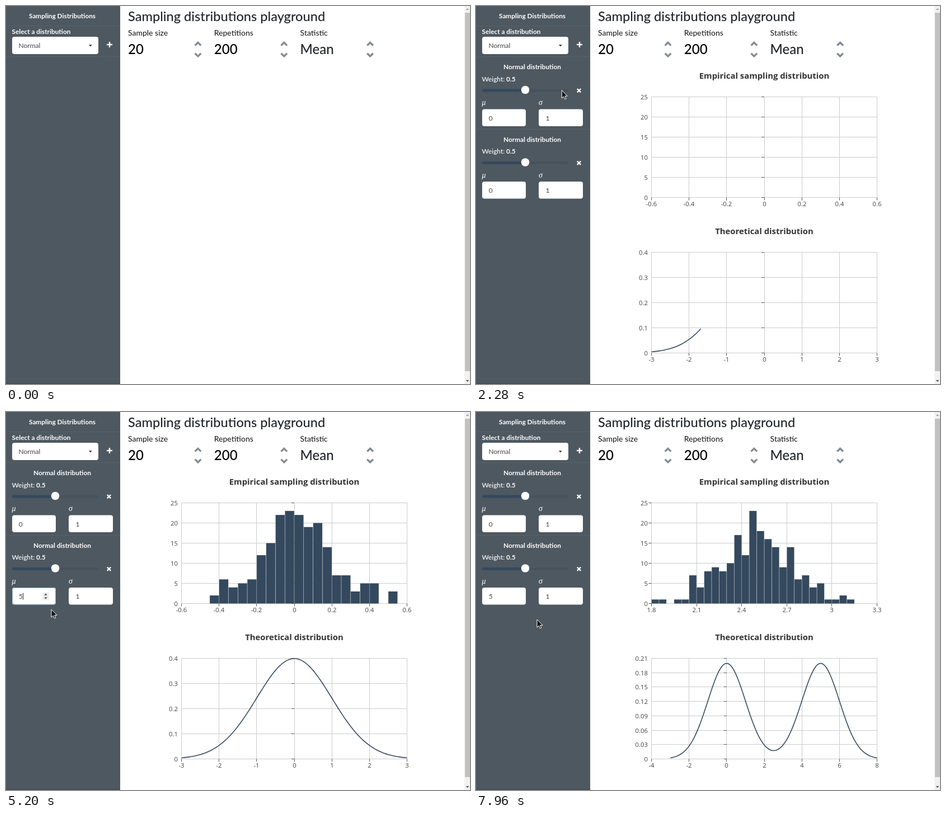
Write an HTML page with a canvas that moves like this. It is 829 by 676 pixels and loops after 8000 ms.

```html
<!DOCTYPE html>
<html lang="en">
<head>
<meta charset="utf-8">
<title>Sampling distributions playground</title>
<style>
html, body { margin: 0; width: 100%; height: 100%; overflow: hidden; background: #fff; }
canvas { display: block; }
</style>
</head>
<body>
<canvas id="stage" width="829" height="676"></canvas>
<script>
const c = document.getElementById('stage').getContext('2d');
const LOOP = 8000;
const NAVY = '#34495e', SIDE = '#4e5860';
const LATO = 'Lato, sans-serif', PLOT = '"Open Sans", sans-serif';

const clamp = v => Math.max(0, Math.min(1, v));
const span = (t, from, to) => clamp((t - from) / (to - from));
const within = (t, from, to) => t >= from && t < to;
const mix = (a, b, k) => a + (b - a) * k;
const expOut = k => k >= 1 ? 1 : 1 - 2 ** (-10 * k);

function text(s, x, y, font, color = '#fff', align = 'left') {
  c.font = font;
  c.fillStyle = color;
  c.textAlign = align;
  c.fillText(s, x, y);
}
function rect(x, y, w, h, color) {
  c.fillStyle = color;
  c.fillRect(x, y, w, h);
}
function round(x, y, w, h, r, color) {
  c.fillStyle = color;
  c.beginPath();
  c.roundRect(x, y, w, h, r);
  c.fill();
}
function disc(x, y, r, color) {
  c.fillStyle = color;
  c.beginPath();
  c.arc(x, y, r, 0, 7);
  c.fill();
}
function trace(points) {
  c.beginPath();
  points.forEach(([x, y]) => c.lineTo(x, y));
}
function line(points, color, width = 1) {
  trace(points);
  c.strokeStyle = color;
  c.lineWidth = width;
  c.stroke();
}
function poly(points, color) {
  trace(points);
  c.fillStyle = color;
  c.fill();
}

// ---- page furniture ----
function header() {
  text('Sampling distributions playground', 218, 27, '500 23.6px ' + LATO, '#212529');
  const fields = [
    ['Sample size', '20', '#000', '#818b94'],
    ['Repetitions', '200', '#000', '#8a8a8a'],
    ['Statistic', 'Mean', '#212529', '#7d8891']
  ];
  fields.forEach(([label, value, ink, arrow], i) => {
    const x = 218 + i * 153.8;
    text(label, x, 53, '14px ' + LATO, '#111');
    text(value, x, 86, '500 24px ' + LATO, ink);
    const m = x + 125;
    line([[m - 5.3, 70.6], [m, 65.3], [m + 5.3, 70.6]], arrow, 3.4);
    line([[m - 5.3, 84.6], [m, 89.9], [m + 5.3, 84.6]], arrow, 3.4);
  });
}
function scrollbar() {
  rect(819, 0, 10, 676, '#f1f1f1');
  rect(820, 12, 9, 641, '#c1c1c1');
  poly([[821.5, 7], [824.5, 4], [827.5, 7]], '#a3a3a3');
  poly([[821.5, 669], [824.5, 672], [827.5, 669]], '#505050');
}
function rule(y) {
  rect(0, y, 204, 1, '#58626a');
}
function sidebar(t) {
  rect(0, 0, 204, 676, SIDE);
  rect(0, 674, 204, 2, '#454e56');
  text('Sampling Distributions', 100.5, 21.5, 'bold 11.8px ' + LATO, '#fff', 'center');
  rule(35);
  text('Select a distribution', 10.5, 50, 'bold 11.8px ' + LATO);
  round(11, 55, 154, 31, 4, '#fff');
  text('Normal', 22.5, 75, '12px ' + LATO, '#444');
  poly([[147.8, 69.2], [153.8, 69.2], [150.8, 72.4]], '#333');
  const plus = within(t, 940, 2100) ? '#28a745' : '#fff';
  rect(180, 67.8, 10, 2.4, plus);
  rect(183.8, 64, 2.4, 10, plus);
  rule(90);
  if (t >= 1400) panel(0);
  if (t >= 1720) panel(129.5, t);
}
function panel(y, t) {
  c.save();
  c.translate(0, y);
  text('Normal distribution', 100.5, 113, 'bold 11.8px ' + LATO, '#fff', 'center');
  text('Weight: ', 10.5, 134.7, '500 11.8px ' + LATO);
  const w = c.measureText('Weight: ').width;
  text('0.5', 10.5 + w, 134.7, 'bold 11.8px ' + LATO);
  round(11, 148.5, 154, 5, 2.5, '#48525b');
  round(11, 148.5, 77, 5, 2.5, NAVY);
  disc(88, 150, 7.3, '#fff');
  line([[180.8, 148], [187.2, 154.4]], '#fff', 2.3);
  line([[187.2, 148], [180.8, 154.4]], '#fff', 2.3);
  text('μ', 10.5, 177, 'italic 14px "Liberation Serif", serif');
  text('σ', 112, 177, 'italic 14px "Liberation Serif", serif');
  round(11, 184.5, 78, 30.5, 4, '#fff');
  round(112, 184.5, 79, 30.5, 4, '#fff');
  text('1', 124.5, 204.8, '12px ' + LATO, '#444');
  if (t) meanField(t);
  else text('0', 22.8, 204.8, '12px ' + LATO, '#444');
  if (!y) rule(220);
  c.restore();
}
function meanField(t) {
  const focus = span(t, 3720, 3880) * (1 - span(t, 5360, 5480));
  if (focus) {
    c.globalAlpha = focus;
    c.strokeStyle = '#8fb4d6';
    c.lineWidth = 1;
    c.beginPath();
    c.roundRect(11.5, 185, 77, 29.5, 4);
    c.stroke();
    c.globalAlpha = 1;
  }
  if (within(t, 3480, 5400)) {
    rect(65, 193, 12, 14, '#efefef');
    poly([[68.3, 198.2], [71, 194.8], [73.7, 198.2]], '#505050');
    poly([[68.3, 201.8], [71, 205.2], [73.7, 201.8]], '#505050');
  }
  const selected = within(t, 3800, 4760);
  if (selected) rect(23, 193.5, 7, 13, '#3390ff');
  text(t < 4760 ? '0' : '5', 22.8, 204.8, '12px ' + LATO, selected ? '#fff' : '#444');
  if (within(t, 3720, 5400) && !selected) rect(30, 194, 1, 12, '#222');
}

// ---- charts ----
const LEFT = 313.5, WIDE = 403, HIGH = 180;
const counts = [
  [2, 6, 4, 5, 6, 12, 15, 22, 23, 22, 19, 20, 14, 7, 7, 3, 5, 5, 0, 3],
  [1, 1, 0, 1, 1, 7, 4, 8, 9, 8, 10, 17, 12, 23, 18, 16, 14, 9, 14, 6, 7, 4, 5, 1, 1, 2, 1]
];
const histAxes = [
  { min: -0.6, max: 0.6, dx: 0.2, top: 25, dy: 5, first: -0.45 },
  { min: 1.8, max: 3.3, dx: 0.3, top: 25, dy: 5, first: 1.8 }
];
const curveAxes = [
  { min: -3, max: 3, dx: 1, top: 0.4, dy: 0.1, end: 3, mu: 0 },
  { min: -4, max: 8, dx: 2, top: 0.21, dy: 0.03, end: 8, mu: 5 }
];
const px = (a, v) => LEFT + WIDE * (v - a.min) / (a.max - a.min);
const label = v => String(+v.toFixed(2));

function axes(title, a, y0) {
  const base = y0 + HIGH;
  text(title, 515, y0 - 32.5, 'bold 14.85px ' + PLOT, '#333', 'center');
  const cols = Math.round((a.max - a.min) / a.dx), rows = Math.round(a.top / a.dy);
  const zero = a.min < 0 ? px(a, 0) : LEFT;
  for (let i = 0; i <= cols; i++) {
    const x = Math.floor(LEFT + WIDE * i / cols) + 0.5;
    line([[x, y0], [x, base]], '#ccc');
    text(label(a.min + i * a.dx), x, base + 15.5, '11.3px ' + PLOT, '#444', 'center');
  }
  for (let i = 0; i <= rows; i++) {
    const y = Math.floor(base - HIGH * i / rows) + 0.5;
    line([[LEFT, y], [LEFT + WIDE, y]], '#ccc');
    text(label(i * a.dy), 307, y + 4.2, '11.3px ' + PLOT, '#444', 'right');
  }
  for (let i = 0; i <= cols; i++) {
    const x = Math.floor(LEFT + WIDE * i / cols) + 0.5;
    line([[x, base], [x, base + 5]], '#555');
  }
  for (let i = 0; i <= rows; i++) {
    const y = Math.floor(base - HIGH * i / rows) + 0.5;
    line([[zero - 5, y], [zero, y]], '#555');
  }
}
function histogram(t) {
  const n = t < 5700 ? 0 : 1, a = histAxes[n], start = n ? 5680 : 2297;
  const grow = expOut(span(t, start, start + 1000));
  axes('Empirical sampling distribution', a, 162.5);
  counts[n].forEach((v, i) => {
    const x = px(a, a.first + i * 0.05), w = WIDE * 0.05 / (a.max - a.min);
    const h = HIGH * v / a.top * grow;
    rect(x + 0.25, 342.5 - h, w - 0.5, h, NAVY);
  });
}
const bell = x => Math.exp(-x * x / 2) / Math.sqrt(2 * Math.PI);
function curvePoint(a, k) {
  const x = mix(-3, a.end, k);
  return [px(a, x), 620.5 - HIGH * (bell(x) + bell(x - a.mu)) / 2 / a.top];
}
function density(t) {
  const [before, after] = curveAxes, updated = t >= 5700;
  const k = 1 - (1 - span(t, 5680, 5980)) ** 3;
  axes('Theoretical distribution', updated ? after : before, 440.5);
  const points = [];
  for (let i = 0; i <= 200; i++) {
    const p = curvePoint(before, i / 200), q = curvePoint(after, i / 200);
    points.push(updated ? [mix(p[0], q[0], k), mix(p[1], q[1], k)] : p);
  }
  c.save();
  c.beginPath();
  c.rect(LEFT - 1, 430, (WIDE + 2) * span(t, 2060, 3060), 200);
  c.clip();
  line(points, NAVY, 1.6);
  c.restore();
}

// ---- pointer ----
const path = [
  [120, 745, 653], [920, 183, 70], [1000, 182, 69], [2060, 182, 69],
  [2560, 112, 268], [2880, 107, 300], [3560, 55, 329], [3720, 55, 329],
  [3880, 13.5, 336.5], [4200, 13.5, 336.5], [4320, 16, 337], [5199, 16, 337],
  [5200, 81, 353], [5440, 108, 408], [7800, 108, 408], [7840, 99, 400],
  [7880, 95, 386], [7920, 102, 375], [7960, 109, 371], [8000, 109, 371]
];
function position(t) {
  const i = path.findIndex(p => p[0] > t);
  const [t0, x0, y0] = path[i - 1], [t1, x1, y1] = path[i];
  let k = span(t, t0, t1);
  if (t1 - t0 > 200) k = k * k * (3 - 2 * k);
  return [mix(x0, x1, k), mix(y0, y1, k)];
}
const arrowShape = new Path2D('M0 0V14.2L3.3 11.2 5.5 16 7.8 15 5.7 10.4H10Z');
const handShape = new Path2D('M-1.4 1.2Q0-.8 1.4 1.2V5.4L5.6 6.5Q6.8 7 6.6 8.8L5.2 13V15.8H-2.4V13L-5.6 8.8Q-6 6.6-4 7L-1.4 9.2Z');
function pointer(t) {
  if (t < 120) return;
  const [x, y] = position(t);
  const clicks = [[1160, 1240], [1520, 1600], [3720, 4240], [5320, 5440]];
  if (clicks.some(([a, b]) => within(t, a, b))) disc(x, y, 9.2, 'rgba(255,255,40,.8)');
  c.save();
  c.translate(x, y);
  if (within(t, 3480, 5200)) {
    line([[-3, -5.5], [-0.8, -5.5], [0, -4.5], [0.8, -5.5], [3, -5.5]], '#333');
    line([[0, -4.5], [0, 5]], '#333');
    line([[-3, 6], [-0.8, 6], [0, 5], [0.8, 6], [3, 6]], '#333');
  } else {
    const hand = within(t, 940, 2100), shape = hand ? handShape : arrowShape;
    c.fillStyle = hand ? '#fff' : '#111';
    c.strokeStyle = hand ? '#111' : '#fff';
    c.lineWidth = 1;
    c.fill(shape);
    c.stroke(shape);
  }
  c.restore();
}

function draw(now) {
  const t = now % LOOP;
  rect(0, 0, 829, 676, '#fff');
  header();
  scrollbar();
  sidebar(t);
  if (t >= 2280) histogram(t);
  if (t >= 2060) density(t);
  pointer(t);
}
let begin;
function tick(now) {
  begin ??= now;
  draw(now - begin);
  requestAnimationFrame(tick);
}
requestAnimationFrame(tick);
</script>
</body>
</html>
```
